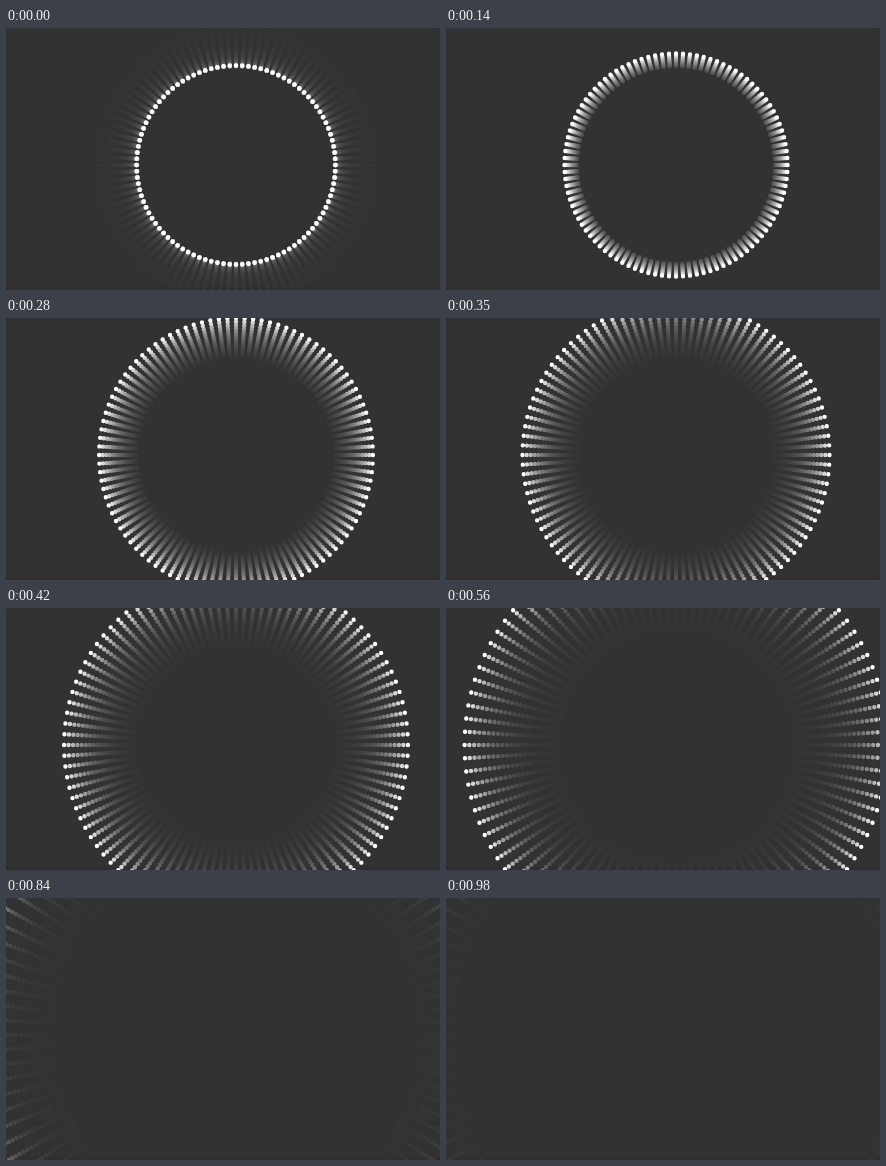
Recreate the animation shown at these times as an HTML page with a canvas. Size 434 by 262 pixels, loop 1050 ms.

```html
<!DOCTYPE html>
<html lang="en">
<head>
<meta charset="utf-8">
<title>Pulsing ring</title>
<style>
  html, body { margin: 0; width: 434px; height: 262px; overflow: hidden; background: #262626; }
  canvas { display: block; border-radius: 2px; }
</style>
</head>
<body>
<canvas width="434" height="262"></canvas>
<script>
const ctx = document.querySelector('canvas').getContext('2d');
const LOOP = 1050, FRAME = 70;      // ms
const DOTS = 100, DOT_RADIUS = 2.2;
const CX = 230, CY = 137;
const TRAIL = 22, STEP = 1000 / 60, FADE = 0.8;
const BASE = 50;                    // background grey

// The ring swings between its smallest and largest radius.
const ringRadius = t => 202 - 103 * Math.cos(0.00277 * (t + 40));

function drawRing(radius, grey) {
  ctx.fillStyle = `rgb(${grey}, ${grey}, ${grey})`;
  ctx.beginPath();
  for (let i = 0; i < DOTS; i++) {
    const angle = i / DOTS * 2 * Math.PI;
    const x = CX + radius * Math.cos(angle);
    const y = CY + radius * Math.sin(angle);
    ctx.moveTo(x + DOT_RADIUS, y);
    ctx.arc(x, y, DOT_RADIUS, 0, 2 * Math.PI);
  }
  ctx.fill();
}

function draw(t) {
  ctx.fillStyle = `rgb(${BASE}, ${BASE}, ${BASE})`;
  ctx.fillRect(0, 0, 434, 262);
  ctx.fillStyle = '#302e2e';
  ctx.fillRect(0, 259, 434, 3);
  // Oldest first, so newer dots cover the fading trail.
  for (let age = TRAIL; age >= 0; age--) {
    const grey = Math.round(BASE + (255 - BASE) * FADE ** age);
    drawRing(ringRadius(t - age * STEP), grey);
  }
}

const start = performance.now();
function tick() {
  const t = (performance.now() - start) % LOOP;
  draw(Math.floor(t / FRAME) * FRAME);
  requestAnimationFrame(tick);
}
tick();
</script>
</body>
</html>
```
